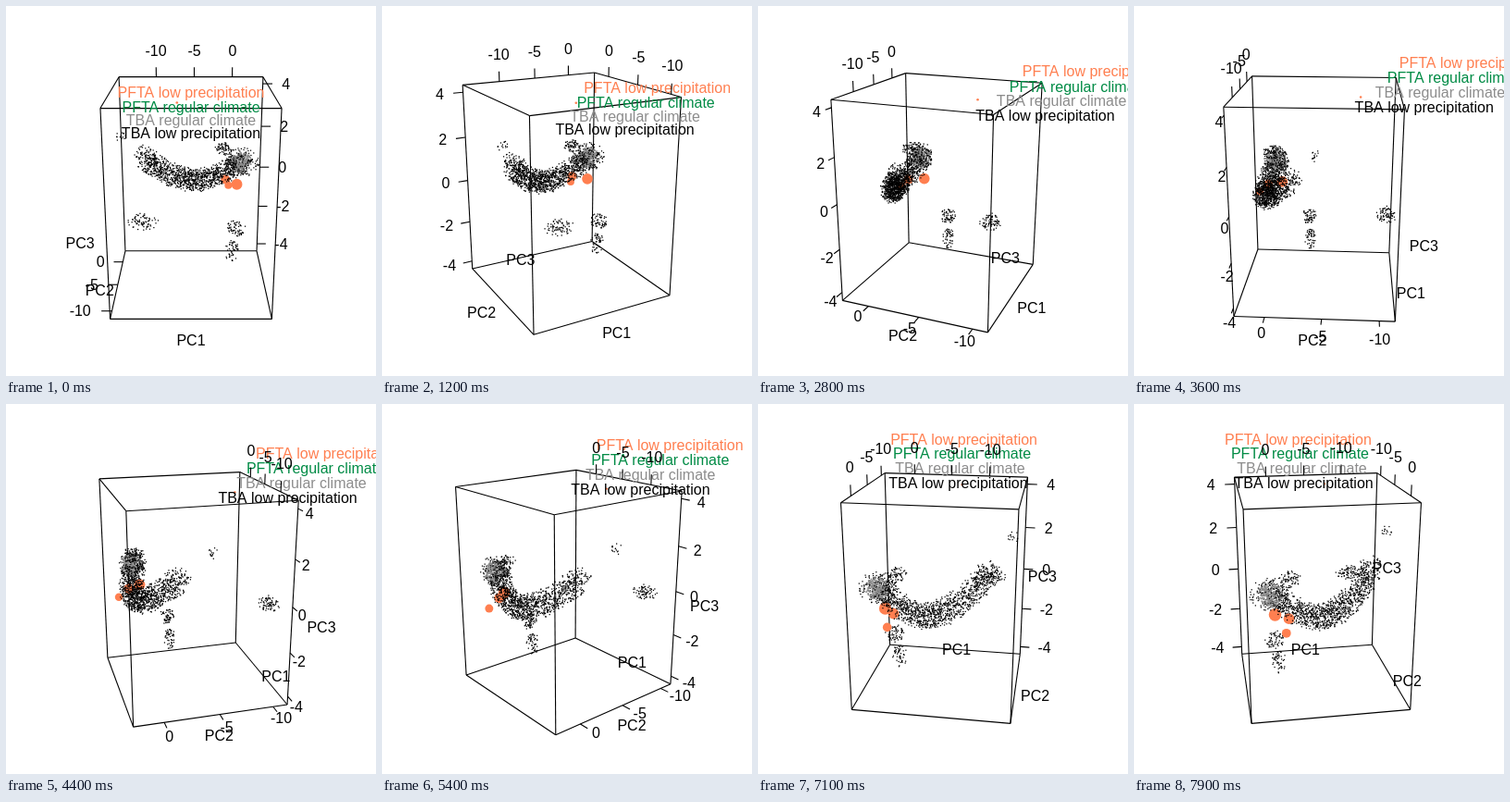
Write an HTML page with a canvas that moves like this. It is 400 px wide and 400 px high and loops after 8 s.

```html
<!DOCTYPE html>
<html>
<head>
<meta charset="utf-8">
<style>
html, body { margin: 0; width: 100%; height: 100%; overflow: hidden; background: #fff; }
canvas { display: block; }
</style>
</head>
<body>
<canvas id="stage" width="400" height="400"></canvas>
<script>
const ctx = document.getElementById('stage').getContext('2d');
const FOCAL = 715, DIST = 8.677, H = 1.324;
const TILT = 19.6 * Math.PI / 180, CT = Math.cos(TILT), ST = Math.sin(TILT);
const BLACK = '#000', CORAL = '#ff7f50', GREEN = '#008b45', GRAY = '#8c8c8c';
const TICK = 0.133, LABEL = 2 * TICK, OUT = 1 + LABEL;

let seed = 7;
function rnd() {
  seed = (seed * 1664525 + 1013904223) % 4294967296;
  return seed / 4294967296;
}

// uniform point in the unit ball
function ball() {
  for (;;) {
    const p = [rnd() * 2 - 1, rnd() * 2 - 1, rnd() * 2 - 1];
    if (Math.hypot(...p) <= 1) return p;
  }
}

const points = [];
function cloud(n, center, radii, color = BLACK, size = 1.25) {
  for (let i = 0; i < n; i++) {
    const b = ball();
    points.push({ p: center.map((v, k) => v + b[k] * radii[k]), color, size });
  }
}
function blob(r, ...p) {
  points.push({ p, r, color: CORAL });
}

// horseshoe: a parabola in both depth and height
function horseshoe(u) {
  const x = -0.64 + 1.32 * Math.pow(u, 1.15);
  return [x, 0.74 - 0.62 * (x - 0.2) ** 2, -0.09 + 0.86 * (x - 0.1) ** 2];
}

for (let i = 0; i < 1250; i++) cloud(1, horseshoe(rnd()), [0.16, 0.17, 0.18]);
cloud(170, [0.7, 0.64, 0.2], [0.25, 0.18, 0.21]);
cloud(70, [0.46, 0.65, 0.38], [0.14, 0.15, 0.1]);
cloud(230, [0.7, 0.65, 0.19], [0.15, 0.15, 0.15], GRAY, 1.7);
cloud(62, [0.62, 0.18, -0.6], [0.13, 0.1, 0.13]);
cloud(50, [0.56, 0.16, -0.92], [0.11, 0.08, 0.19]);
cloud(75, [-0.575, -0.866, -0.08], [0.19, 0.13, 0.1]);
cloud(14, [-0.9, 0, 0.75], [0.08, 0.07, 0.07]);
blob(0.077, 0.64, 0.56, -0.1);
blob(0.066, 0.49, 0.74, -0.09);
blob(0.054, 0.54, 0.87, -0.22);
blob(0.014, -0.165, -0.52, 1.285);

const legend = [
  ['PFTA low precipitation', CORAL], ['PFTA regular climate', GREEN],
  ['TBA regular climate', GRAY], ['TBA low precipitation', BLACK]
];

let sin = 0, cos = 1;
function project([x, y, z]) {
  const u = x * cos - y * sin, w = x * sin + y * cos;
  const d = DIST + w * CT - z * ST;
  return [200 + FOCAL * u / d, 200 - FOCAL * (z * CT + w * ST) / d, d];
}

function line(a, b) {
  const p = project(a), q = project(b);
  ctx.beginPath();
  ctx.moveTo(p[0], p[1]);
  ctx.lineTo(q[0], q[1]);
  ctx.stroke();
}

function text(str, x, y, color = BLACK) {
  ctx.fillStyle = color;
  ctx.fillText(str, x, Math.round(y + 5.5));
}

function textAt(str, point, lift = 0, color = BLACK) {
  const [x, y] = project(point);
  text(str, x, y - lift, color);
}

function drawBox() {
  for (const a of [-1, 1]) {
    for (const b of [-1, 1]) {
      line([-1, a, b * H], [1, a, b * H]);
      line([a, -1, b * H], [a, 1, b * H]);
      line([a, b, -H], [a, b, H]);
    }
  }
}

function drawPoints() {
  const list = points.map(o => ({ o, s: project(o.p) })).sort((a, b) => b.s[2] - a.s[2]);
  for (const { o, s } of list) {
    ctx.fillStyle = o.color;
    if (o.r) {
      ctx.beginPath();
      ctx.arc(s[0], s[1], o.r * FOCAL / s[2], 0, Math.PI * 2);
      ctx.fill();
    } else {
      ctx.fillRect(s[0] - o.size / 2, s[1] - o.size / 2, o.size, o.size);
    }
  }
}

// labels lean away from the edge they belong to
function tick(value, base, dir) {
  const move = d => base.map((v, k) => v + dir[k] * d);
  line(base, move(TICK));
  const a = project(base), b = project(move(LABEL));
  const dx = b[0] - a[0], dy = b[1] - a[1];
  const lean = Math.atan2(Math.abs(dy), Math.abs(dx)) / (Math.PI / 4);
  const str = String(value), w = ctx.measureText(str).width;
  text(str, b[0] + Math.sign(dx) * w / 2 * Math.max(0, 1 - lean),
    b[1] + Math.sign(dy) * 7.5 * Math.max(0, lean - 1));
}

// ticks sit on outline edges, chosen by which sides face away
function drawAxes() {
  const bx = sin >= 0 ? 1 : -1, by = cos > 0 ? 1 : -1;
  const flat = sin === 0;
  const low = flat || Math.abs(sin) > 0.5;
  const zx = flat ? bx : -bx;
  for (let v = -10; v <= 0; v += 5) {
    tick(v, [0.571 + 0.1053 * v, by, H], [0, 0, 1]);
    const y = 0.617 + 0.1422 * v;
    if (low) tick(v, [-bx, y, -H], [-bx, 0, 0]);
    else tick(v, [bx, y, H], [0, 0, 1]);
  }
  for (let v = -4; v <= 4; v += 2) {
    tick(v, [zx, by, 0.012 + 0.3042 * v], [zx, 0, 0]);
  }
}

function drawTitles() {
  textAt('PC1', [0, -OUT, -H - TICK]);
  textAt('PC2', [-OUT, 0, -H - TICK]);
  textAt('PC3', [-OUT, -OUT, -0.18]);
}

function drawLegend() {
  legend.forEach(([str, color], i) => {
    const m = 1.87 - 0.185 * i;
    textAt(str, [0, -m, m - 0.272], 8, color);
  });
}

function draw(step) {
  const turn = step * 2.4 * Math.PI / 180;
  sin = Math.sin(turn);
  cos = Math.cos(turn);
  ctx.fillStyle = '#fff';
  ctx.fillRect(0, 0, 400, 400);
  ctx.font = '16px "Liberation Sans", Arial, sans-serif';
  ctx.textAlign = 'center';
  ctx.strokeStyle = BLACK;
  ctx.lineWidth = 1.1;
  drawBox();
  drawPoints();
  drawLegend();
  drawAxes();
  drawTitles();
}

const start = performance.now();
let last = -1;
function loop() {
  const step = Math.floor((performance.now() - start) / 100) % 80;
  if (step !== last) draw(last = step);
  requestAnimationFrame(loop);
}
loop();
</script>
</body>
</html>
```
